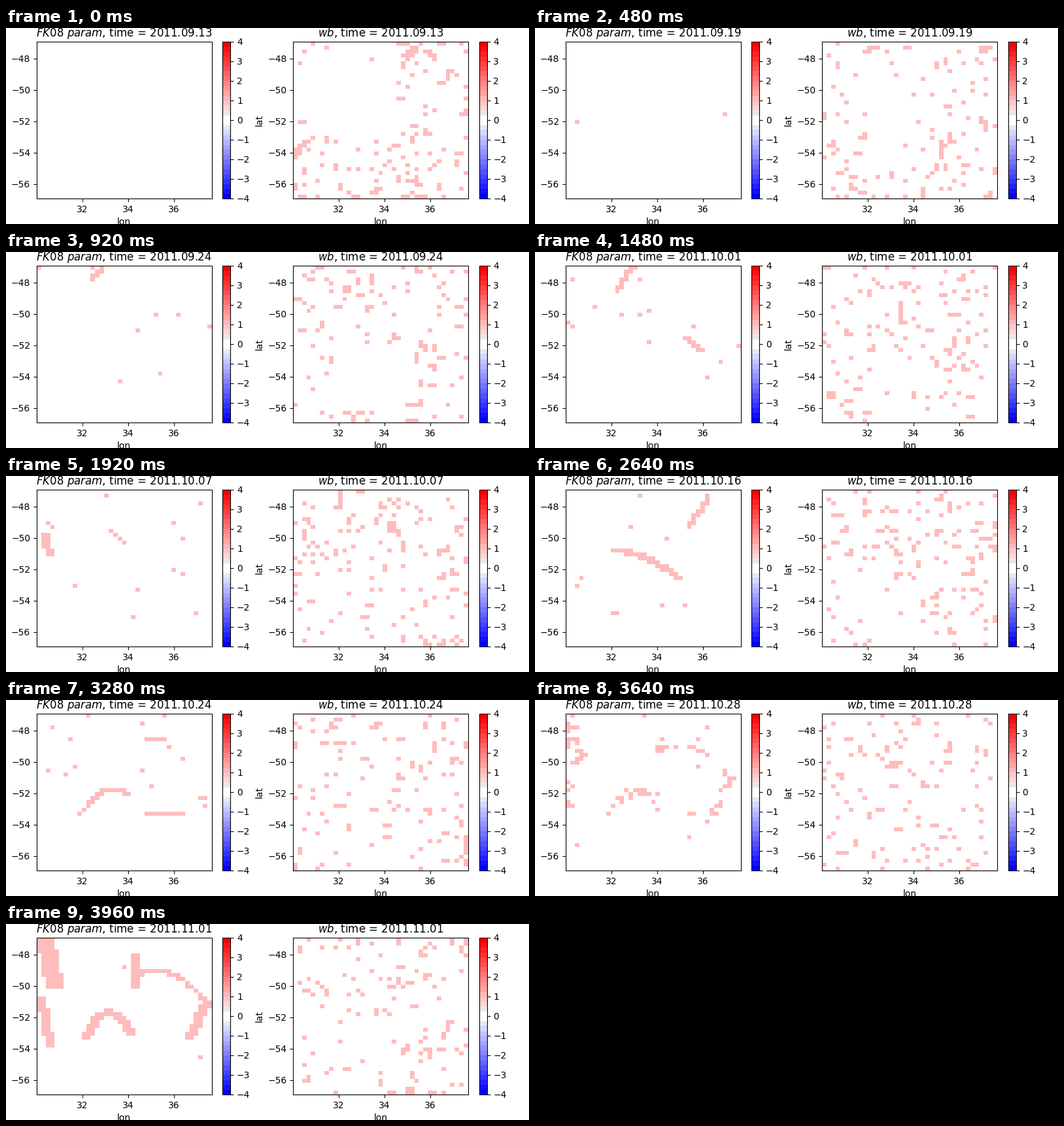
These frames come from a looping animation (800 by 300 pixels, 4000 ms). A matplotlib script:

```python
import numpy as np
import matplotlib.pyplot as plt
from matplotlib.animation import FuncAnimation
from matplotlib.cm import ScalarMappable
from matplotlib.colors import ListedColormap, Normalize

W, H, DPI = 800, 300, 100
FRAMES, STEP = 100, 40
ROWS, COLS = 40, 39
EXTENT = (30.0, 37.65, -56.92, -46.92)
PINK = "#ffbcbc"
LIFE = 13  # frames a filament takes to form or break up

plt.rcParams["font.family"] = "DejaVu Sans"


def bar_colors(n=32):
    """Blue-white-red steps with a grey rim around the white middle."""
    colors = []
    for u in np.linspace(-1, 1, n):
        fade = 1 - abs(u)
        if abs(u) < 0.05:
            colors.append((1, 1, 1))
        elif abs(u) < 0.12:
            colors.append((0.914, 0.914, 0.914))
        else:
            colors.append((1, fade, fade) if u > 0 else (fade, fade, 1))
    return colors


# --- left field: filaments that form and break up, among loose specks ---

rng = np.random.default_rng(8)


def arc(peak, start, end, bend=0, width=1):
    """Cells on a bent line between two (col, row) points, thickened sideways."""
    u = np.linspace(0, 1, 40)
    x = start[0] + (end[0] - start[0]) * u
    y = start[1] + (end[1] - start[1]) * u - 4 * bend * u * (1 - u)
    cells = {(int(round(r)), int(round(c)) + k)
             for r, c in zip(y, x) for k in range(width)}
    cells = np.array(sorted(cells))
    return peak, cells, rng.random(len(cells))


arcs = [
    arc(23, (12, 3), (14, 0)),
    arc(37, (11, 6), (15, 0), 1),
    arc(37, (26, 18), (30, 21)),
    arc(48, (1, 11), (2, 16), -1, 2),
    arc(48, (16, 10), (19, 13)),
    arc(66, (10, 15), (24, 22), 1.5, 2),
    arc(66, (27, 9), (31, 2)),
    arc(82, (10, 24), (20, 20), 3),
    arc(82, (24, 25), (32, 25)),
    arc(82, (24, 6), (28, 6)),
    arc(99, (0, 0), (2, 12), 0, 4),
    arc(99, (0, 15), (2, 27), 0, 2),
    arc(99, (10, 25), (20, 24), 6, 2),
    arc(99, (21, 4), (21, 12), 0, 2),
    arc(99, (22, 9), (38, 17), 4),
    arc(99, (33, 25), (37, 16), 0, 2),
]

SPECKS = 110
birth = rng.uniform(14, 104, SPECKS)
speck_col = rng.integers(0, COLS, SPECKS)
speck_row = (34 * rng.random(SPECKS) ** 1.3).astype(int)


def left_field(f):
    grid = np.zeros((ROWS, COLS))
    for peak, cells, order in arcs:
        drift = int((f - peak) / 5)
        for r, c in cells[order < 1 - abs(f - peak) / LIFE]:
            if 0 <= r < ROWS and 0 <= c + drift < COLS:
                grid[r, c + drift] = 1
    live = abs(f - birth) < 4
    grid[speck_row[live], speck_col[live]] = 1
    return grid


# --- right field: patchy noise, thinner around a gap that sinks and fades ---

yy, xx = np.mgrid[:ROWS, :COLS]


def right_field(f):
    noise = np.random.default_rng(500 + f).normal(size=(ROWS, COLS))
    noise += 0.25 * (np.roll(noise, 1, 0) + np.roll(noise, 1, 1))
    fade = np.exp(-f / 25)
    dist = (xx - 13) ** 2 + (yy - 33 + 20 * fade) ** 2
    noise -= (0.4 + 1.2 * fade) * np.exp(-dist / 90)
    share = 0.09 + 0.01 * np.sin(f * 0.09 - 3.5)
    return noise > np.quantile(noise, 1 - share)


def date(f):
    month, day = 9, 13 + f // 2
    for days in (30, 31):
        if day > days:
            month, day = month + 1, day - days
    return f"2011.{month:02d}.{day:02d}"


# --- stage ---

fig = plt.figure(figsize=(W / DPI, H / DPI), dpi=DPI, facecolor="white")
bar_map = ScalarMappable(Normalize(-4, 4), ListedColormap(bar_colors()))
cell_map = ListedColormap(["white", PINK])


def box(x, w):
    return fig.add_axes([x / W, 39 / H, w / W, 240 / H])


def panel(x):
    ax = box(x, 267.7)
    img = ax.imshow(np.zeros((ROWS, COLS)), cmap=cell_map, vmin=0, vmax=1,
                    extent=EXTENT, aspect="auto", interpolation="nearest")
    ax.set_xticks(range(32, 38, 2))
    ax.set_yticks(range(-56, -46, 2))
    ax.set_xlabel("lon")
    bar = fig.colorbar(bar_map, cax=box(x + 284.4, 12))
    bar.set_ticks(range(-4, 5))
    return ax, img, ax.set_title("", y=1.0, pad=6)


ax1, img1, title1 = panel(46.9)
ax2, img2, title2 = panel(439.2)
ax2.set_ylabel("lat")


def draw(f):
    img1.set_data(left_field(f))
    img2.set_data(right_field(f).astype(float))
    title1.set_text(rf"$FK08\ param$, time = {date(f)}")
    title2.set_text(rf"$wb$, time = {date(f)}")
    return img1, img2, title1, title2


anim = FuncAnimation(fig, draw, frames=FRAMES, interval=STEP,
                     init_func=lambda: draw(0), repeat=True, repeat_delay=0)
plt.show()
```
